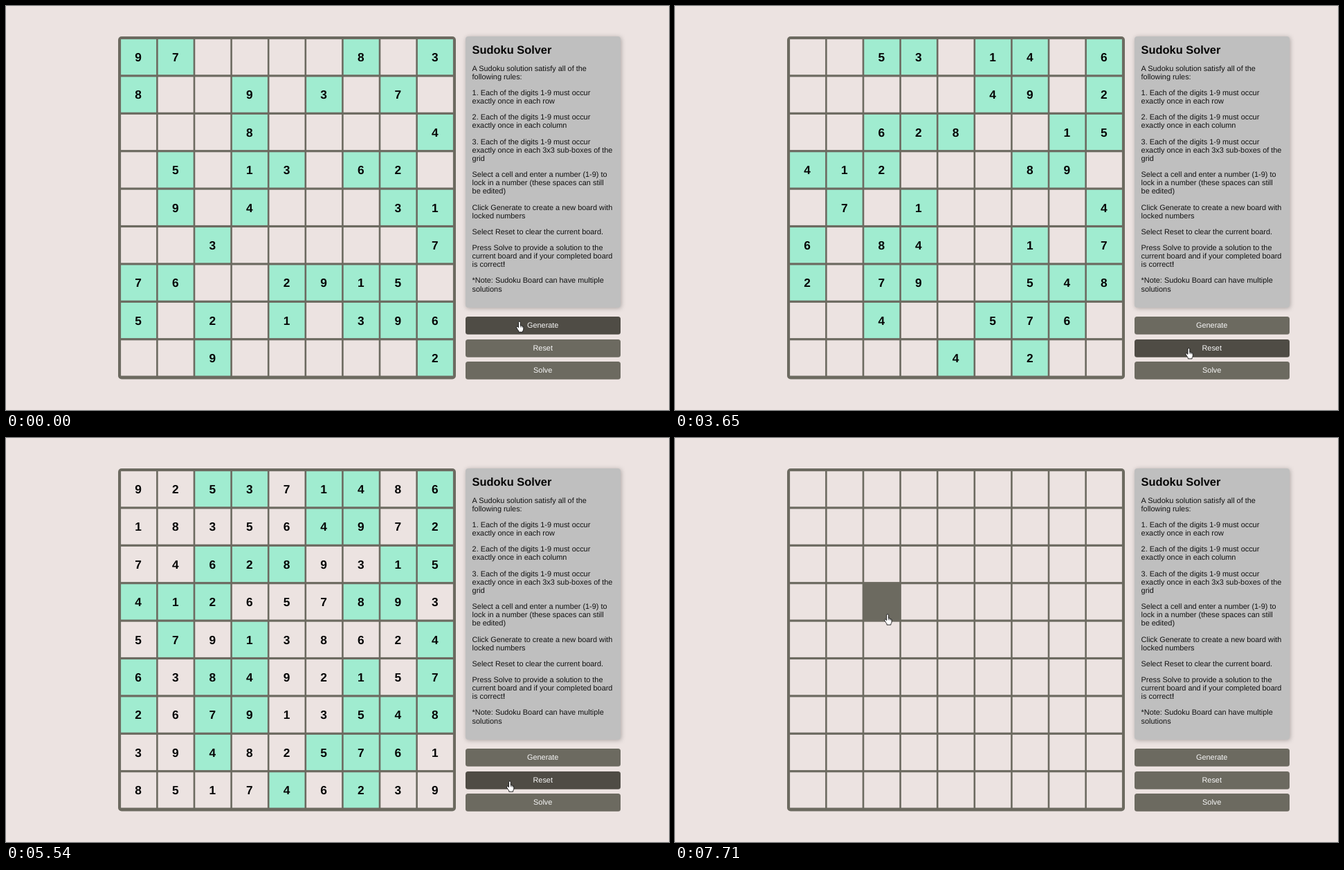
An HTML page that plays this animation: 958x584 px, repeating every 8 s.

```html
<!DOCTYPE html>
<html lang="en">
<head>
<meta charset="utf-8">
<title>Sudoku Solver</title>
<style>
  html, body { margin: 0; width: 100%; height: 100%; overflow: hidden; background: #ece3e1; }
  svg { display: block; width: 958px; height: 584px; }
  text { font-family: "Liberation Sans", Arial, sans-serif; text-rendering: geometricPrecision; }
  .rules { font-size: 10.9px; fill: #111; }
  .title { font-size: 16.4px; font-weight: bold; fill: #060606; }
  .digit { font-size: 17.3px; font-weight: bold; fill: #060606; text-anchor: middle; }
  .label { font-size: 10.9px; fill: #f8f8f8; text-anchor: middle; }
  .panel { filter: drop-shadow(1px 1px 3px rgba(0, 0, 0, .28)); }
</style>
</head>
<body>
<svg id="stage" viewBox="0 0 958 584"></svg>
<script>
const LOOP = 8000, HOVER_LAG = 130, PICK_AT = 7710;
const BG = '#ece3e1', LINE = '#6c6a60', GREEN = '#a0ecd0';
const CELL_HOVER = '#dad2d0', BUTTON_HOVER = '#4f4c45';
const CELL = { w: 51, h: 51.2 }, PITCH = { x: 53.6, y: 54.4 };

// Dots are blank cells; in the solution, brackets enclose the given digits.
const first = '97....8.3 8..9.3.7. ...8....4 .5.13.62. .9.4...31 ..3.....7 76..2915. 5.2.1.396 ..9.....2';
const second = '53..8927. ...572..3 9.7136... .5....... ...3..5.. 47.951.3. 1...6.... ..47953.. 7.....9..';
const solution = '92[53]7[14]8[6] 18356[49]7[2] 74[628]93[15] [412]657[89]3 5[7]9[1]3862[4] ' +
  '[6]3[84]92[1]5[7] [2]6[79]13[548] 39[4]82[576]1 8517[4]6[2]39';

const plain = s => s.replace(/[^\d.]/g, '');
const solved = plain(solution);
const third = plain(solution.replace(/\[(\d+)\]|\d/g, (m, given) => given || '.'));
const empty = '.'.repeat(81);

// Start, digits shown, digits that are given.
const boards = [
  [0, plain(first)], [1370, plain(second)], [2830, third], [4360, solved, third], [6060, empty]
];

// The pointer is redrawn in n steps along a curve bent towards `via`.
const home = [742, 456];
const moves = [
  { start: 3230, end: 4060, n: 7, power: 1, via: [745, 490], to: [739, 523.3] },
  { start: 5270, end: 5540, n: 3, power: 2, via: [733, 510], to: [728, 496] },
  { start: 6620, end: 7460, n: 8, power: 2, via: [565, 478], to: [307.3, 254.8] }
];

const rules = [
  ['A Sudoku solution satisfy all of the', 'following rules:'],
  ['1. Each of the digits 1-9 must occur', 'exactly once in each row'],
  ['2. Each of the digits 1-9 must occur', 'exactly once in each column'],
  ['3. Each of the digits 1-9 must occur', 'exactly once in each 3x3 sub-boxes of the', 'grid'],
  ['Select a cell and enter a number (1-9) to', 'lock in a number (these spaces can still', 'be edited)'],
  ['Click Generate to create a new board with', 'locked numbers'],
  ['Select Reset to clear the current board.'],
  ['Press Solve to provide a solution to the', 'current board and if your completed board', 'is correct!'],
  ['*Note: Sudoku Board can have multiple', 'solutions']
];

const stage = document.getElementById('stage');

function add(tag, attrs, text = '', parent = stage) {
  const el = document.createElementNS('http://www.w3.org/2000/svg', tag);
  for (const key in attrs) el.setAttribute(key, attrs[key]);
  el.textContent = text;
  return parent.appendChild(el);
}

function box(x, y, width, height, fill, rx = 0) {
  const el = add('rect', { x, y, width, height, fill, rx });
  return {
    fill: color => el.setAttribute('fill', color),
    has: ([px, py]) => px >= x && px < x + width && py >= y && py < y + height,
    el
  };
}

box(162, 44, 488, 495.5, LINE, 5);
const cells = Array.from(empty, (_, i) => {
  const dx = i % 9 * PITCH.x, dy = Math.floor(i / 9) * PITCH.y;
  return {
    ...box(166.1 + dx, 48.1 + dy, CELL.w, CELL.h, BG),
    text: add('text', { class: 'digit', x: 191.1 + dx, y: 79.9 + dy })
  };
});

box(664, 44, 224, 392, '#bfbfbf', 4).el.setAttribute('class', 'panel');
add('text', { class: 'title', x: 673.6, y: 69.2 }, 'Sudoku Solver');
let lineY = 93.6;
for (const para of rules) {
  for (const line of para) {
    const [, words, bang] = line.match(/^(.*?)(!?)$/);
    const el = add('text', { class: 'rules', x: 673.6, y: lineY }, words);
    add('tspan', { 'font-weight': 'bold' }, bang, el);
    lineY += 12.2;
  }
  lineY += 10.9;
}

const buttons = ['Generate', 'Reset', 'Solve'].map((name, i) => {
  const y = Math.round(449 + i * 32.5);
  const button = box(664, y, 224, 25.7, LINE, 3.5);
  add('text', { class: 'label', x: 775.7, y: 465.4 + i * 32.5 }, name);
  return button;
});

const hand = add('g', { stroke: '#111', 'stroke-width': .9, 'stroke-linejoin': 'round' });
add('path', {
  fill: '#fff',
  d: 'M-1.5 8.8V1.4a1.4 1.4 0 0 1 2.8 0V6q1-.8 1.6.4 1-.6 1.6.5 1.3-.2 1.3 1.3v2.6' +
     'q0 2-1.2 3.2v1.3H-1.2v-1.4q-1.6-2-3.2-4.9-.5-1.2.5-1.6 1.1-.2 2.4 1.4z'
}, '', hand);
add('path', { fill: 'none', 'stroke-width': .6, d: 'M1.3 6v2.4M2.9 6.4v2.2M4.5 6.9v1.9' }, '', hand);

function pointerAt(t) {
  let from = home;
  for (const { start, end, n, power, via, to } of moves) {
    if (t < start) break;
    const step = Math.floor((t - start) / (end - start) * (n - 1)) + 1;
    const s = 1 - (1 - Math.min(step / n, 1)) ** power;
    const origin = from;
    from = to.map((v, i) => origin[i] * (1 - s) ** 2 + 2 * s * (1 - s) * via[i] + v * s * s);
  }
  return from;
}

function draw(t) {
  const [, digits, given = digits] = boards.filter(b => b[0] <= t).pop();
  const tip = pointerAt(t), lateTip = pointerAt(t - HOVER_LAG);
  cells.forEach((cell, i) => {
    const over = cell.has(tip);
    cell.fill(over && t >= PICK_AT ? LINE : given[i] !== '.' ? GREEN : over ? CELL_HOVER : BG);
    cell.text.textContent = digits[i] === '.' ? '' : digits[i];
  });
  buttons.forEach(b => b.fill(b.has(lateTip) ? BUTTON_HOVER : LINE));
  hand.setAttribute('transform', `translate(${tip})`);
}

const began = performance.now();
function tick() {
  draw((performance.now() - began) % LOOP);
  requestAnimationFrame(tick);
}
tick();
</script>
</body>
</html>
```
